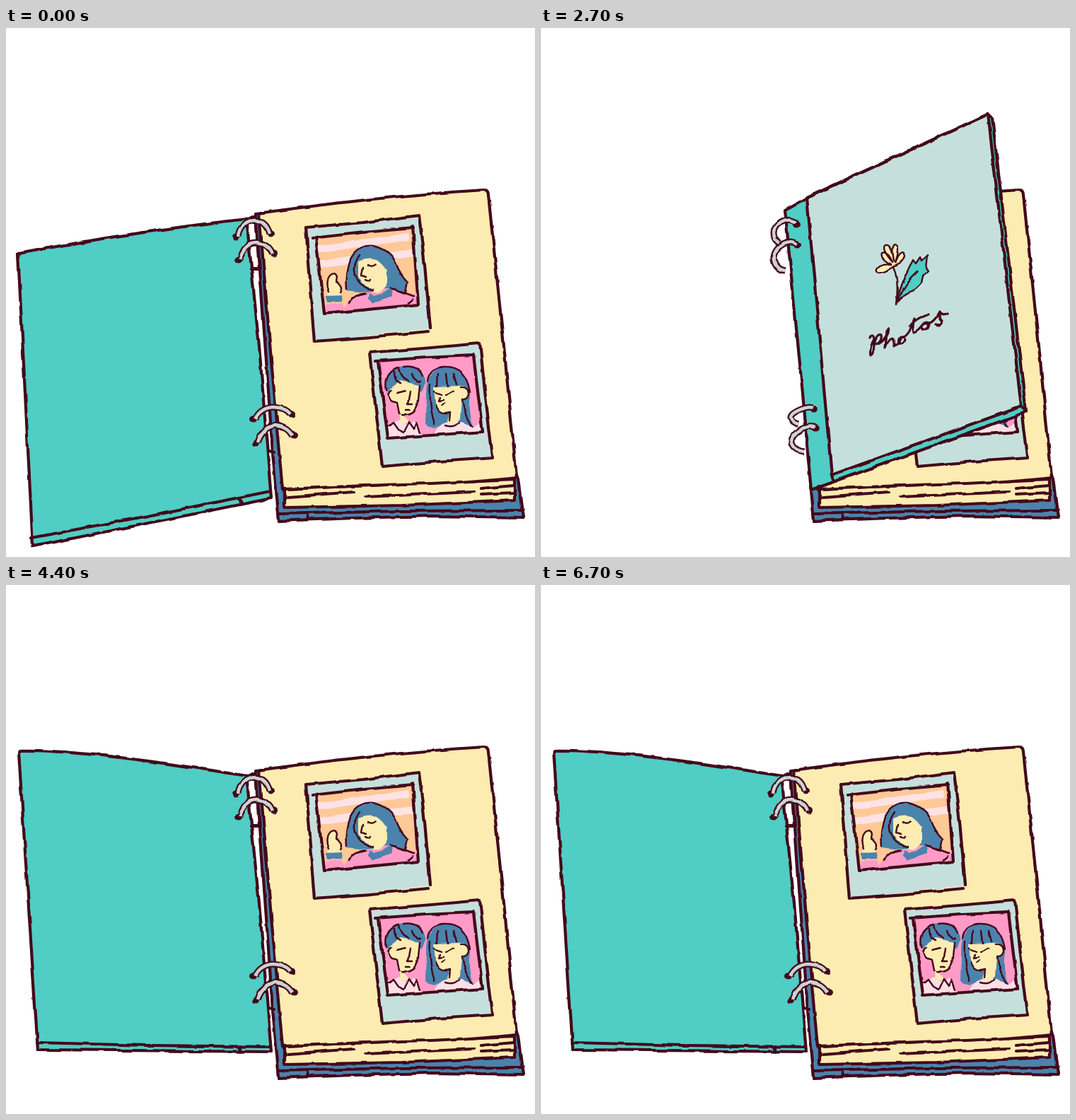
An HTML page for the animation above (6810 ms loop, 748 by 748 pixels).

```html
<!DOCTYPE html>
<html lang="en">
<head>
<meta charset="utf-8">
<title>Photo album</title>
<style>
  html, body { margin: 0; width: 100%; height: 100%; overflow: hidden; background: #fff; }
  svg { display: block; width: 100%; height: 100%; }
  path { fill: none; stroke-linecap: round; stroke-linejoin: round; }
  .ink { stroke: #43081a; stroke-width: 4.2; vector-effect: non-scaling-stroke; }
  .fine { stroke-width: 2.4; }
  .script { stroke-width: 3.2; }
  .teal { fill: #50cdc4; }
  .pale { fill: #c5e0dc; }
  .cream { fill: #fdecb1; }
  .blue { fill: #4b83ad; }
  .pink { fill: #ff9bc6; }
  .blush { fill: #fbdfe6; }
  .orange { fill: #ffc897; }
  .stripe { stroke: #fde3e6; stroke-width: 10; stroke-linecap: butt; }
  .ring { stroke: #43081a; stroke-width: 9; stroke-linecap: butt; }
  .shine { stroke: #cdd2d4; stroke-width: 4.4; stroke-linecap: butt; }
  .hole { fill: #43081a; }
  #poses > g { display: none; }
</style>
</head>
<body>
<svg viewBox="0 0 748 748">
  <!-- Slight unevenness of a hand-held pen -->
  <filter id="pen" filterUnits="userSpaceOnUse" x="0" y="0" width="748" height="748" color-interpolation-filters="sRGB">
    <feTurbulence type="fractalNoise" baseFrequency=".04" numOctaves="2" seed="4"/>
    <feDisplacementMap in="SourceGraphic" scale="5" xChannelSelector="R" yChannelSelector="G"/>
  </filter>

  <g filter="url(#pen)">
    <g id="book">
      <path class="ink blue" d="M353 262 L359 342 L377 600 L386 697 Q480 693 600 690 L731 692 L724 638 L640 400 L362 261Z"/>
      <path class="ink cream" d="M394 652 L394 678 L560 675 L719 668 L719 638Z"/>
      <path class="ink cream" d="M358 262 Q400 256 440 251 Q560 236 676 229 Q682 229 682 236 L703 440 L722 635 Q640 644 560 645 L392 652 L375 470Z"/>
      <path class="ink" d="M398 663 L493 656 M508 663 L661 656 M672 651 L718 647 M671 660 L719 658 M386 687 L560 683 L729 682 M427 686 L427 694"/>
    </g>

    <g id="portrait">
      <path class="pale" d="M424 282 L584 265 L600 425 L437 443Z"/>
      <path class="orange" d="M438 296 L576 283 L583 391 L450 404Z"/>
      <path class="stripe" d="M440 313 L490 306 L570 295 M442 334 L490 327 L577 318"/>
      <path class="pink" d="M449 404 L453 391 L474 389 L478 395 L486 384 L504 374 L545 369 L580 377 L583 391Z"/>
      <path class="blue" d="M482 372 Q480 352 486 326 Q497 306 517 307 Q545 314 552 334 Q557 348 568 359 L564 374 L540 369 L500 374Z"/>
      <path class="cream" d="M498 330 Q512 324 524 328 Q533 334 538 343 L538 365 Q529 378 519 373 L516 368 Q500 364 498 350Z"/>
      <path class="cream" d="M456 378 Q451 359 457 349 Q464 342 468 350 L467 359 Q479 365 474 371 L472 381Z"/>
      <path class="blue" d="M452 379 L475 378 L474 387 L454 388Z M513 374 L521 378 L532 376 L545 367 L546 380 L534 384 L520 389 L512 382Z"/>
      <path class="ink fine" d="M500 321 Q488 338 496 354 Q500 367 518 370 M482 370 Q480 348 487 327 Q498 306 519 308 Q544 313 552 334 Q557 348 568 359 L565 374 L544 368 M504 338 L502 350 L508 352 M511 336 Q518 340 523 335 M507 356 Q511 359 514 355 M456 372 Q450 357 458 349 Q466 344 468 352 L467 359 Q479 366 473 374 M485 388 Q494 377 508 375 M549 369 L576 379 M568 389 L575 383"/>
      <path class="ink" d="M433 297 L506 289 L576 283 M438 296 L450 404 L583 391 L575 280 M437 443 L424 282 L505 275 L584 265 L592 335 L600 424 M437 443 L515 437 L597 429"/>
    </g>

    <g id="couple">
      <path class="pale" d="M514 459 L670 446 L688 607 L532 620Z"/>
      <path class="pink" d="M526 472 L662 463 L674 571 L540 580Z"/>
      <path class="blue" d="M538 514 Q533 485 555 479 Q580 475 588 490 Q596 499 588 514Z M594 520 Q593 482 622 478 Q654 480 656 520 Q652 545 661 563 L640 562 L626 558 L606 566 L593 560Z"/>
      <path class="blush" d="M539 578 L537 562 L557 554 L567 563 L577 556 L588 576Z M606 574 Q612 561 625 557 L644 557 L660 563 L672 558 L673 571Z"/>
      <path class="cream" d="M543 510 L558 499 L584 505 L582 534 Q575 549 561 546 L570 560 L558 558 L556 534 L548 530 Q537 520 543 510Z M606 507 L643 506 Q655 506 654 518 Q652 526 644 525 L642 553 Q634 564 624 556 L627 546 Q612 547 608 530Z"/>
      <path class="ink fine" d="M538 512 Q534 486 555 480 M549 486 Q549 500 558 503 M556 480 Q558 496 569 499 M574 489 Q576 498 585 500 M563 479 Q582 476 588 492 M544 512 Q536 521 546 528 L554 530 L557 545 M553 516 L565 513 M572 513 L569 532 L575 532 M566 540 L571 540 M584 505 L581 536 Q576 549 560 547 M541 563 L547 558 L554 568 L562 572 L569 558 L576 568 L580 559 L585 572"/>
      <path class="ink fine" d="M595 500 Q598 481 618 479 Q650 477 656 515 M600 503 Q598 535 606 560 M611 489 L610 506 M622 489 L624 506 M633 488 L637 504 M643 508 Q654 507 654 518 Q652 526 645 525 Q649 552 659 562 M606 514 L616 518 M622 518 L632 513 M614 522 L612 527 L619 526 M617 533 L621 531 M608 533 Q613 549 628 544 L627 555 M622 562 Q634 566 641 558"/>
      <path class="ink" d="M522 471 L594 466 L661 463 L674 571 L540 580 L526 472 M532 620 L514 459 L590 453 L670 446 L680 540 L688 605 M532 620 L610 613 L688 608"/>
    </g>

    <g id="poses"></g>
  </g>
</svg>

<script>
const line = (cls, d) => `<path class="${cls}" d="${d}"/>`;
const poly = (cls, ...points) => line(cls, `M${points.join(' L')}Z`);
const stroke = (...points) => line('ink', `M${points.join(' L')}`);
const hole = ([x, y]) => `<ellipse class="hole" cx="${x}" cy="${y}" rx="5" ry="4.5"/>`;
const ring = (d, ...ends) => ends.map(hole).join('') + line('ring', d) + line('shine', d);

const openRings =
  stroke([343, 270], [353, 265], [358, 341], [346, 341]) +
  stroke([371, 598], [380, 600]) +
  ring('M328 295 Q332 273 353 272 Q368 273 373 291', [325, 296], [375, 291]) +
  ring('M331 327 Q336 303 354 303 Q371 305 377 320', [329, 328], [379, 319]) +
  ring('M352 553 Q360 537 378 536 Q396 537 402 546', [349, 553], [404, 546]) +
  ring('M356 586 Q362 565 381 562 Q398 564 405 577', [353, 587], [407, 577]);

// Rings seen from the spine; shift moves the holes with the cover.
function sideRings(shift) {
  const low = shift * .8;
  return ring(`M${350 + shift} 276 C${344 + shift} 267 330 272 329 290 Q329 301 338 304`, [351 + shift, 278]) +
    ring(`M${351 + shift} 306 C${344 + shift} 296 327 306 329 328 Q332 342 345 343`, [352 + shift, 307]) +
    ring(`M${376 + low} 537 C${368 + low} 534 353 543 353 551 Q355 558 364 560`, [377 + low, 539]) +
    ring(`M${379 + low} 565 C${368 + low} 559 352 573 354 587 Q358 598 372 599`, [380 + low, 566]);
}

const art =
  line('ink fine cream', 'M497 337 Q490 346 477 346 Q470 342 478 336 Q486 332 495 334 Q479 326 482 318 Q490 315 497 331 Q480 311 487 307 Q496 305 499 329 Q495 307 501 306 Q509 309 501 331 Q509 315 513 319 Q515 330 497 337Z') +
  line('ink fine teal', 'M502 388 Q508 361 517 347 L526 328 L530 333 L536 324 L538 329 L546 321 L544 340 L547 344 L539 352 L537 361 L527 371 Q512 375 502 388Z') +
  line('ink fine', 'M498 337 Q507 359 502 390 M503 386 Q515 358 532 344') +
  line('ink script', 'M464 438 Q470 431 471 440 Q464 452 466 464 Q471 460 471 446 Q475 431 481 434 Q483 443 472 447 Q484 445 491 430 Q493 422 489 428 L487 452 Q492 438 497 438 Q500 444 499 450 Q505 446 509 436 Q503 438 505 445 Q511 448 514 440 Q514 434 509 436 Q518 439 528 412 Q524 428 528 431 Q535 429 542 418 Q537 422 540 427 Q548 428 549 418 Q546 414 542 418 Q554 420 563 402 Q562 411 567 415 Q566 422 558 419 M563 403 Q568 408 575 404 M521 421 Q534 410 548 405');

const frame = ({ tl, tr, bl }) =>
  new DOMMatrix([tr[0] - tl[0], tr[1] - tl[1], bl[0] - tl[0], bl[1] - tl[1], ...tl]);

function insideCover({ tl, bl, side, foot, top, seam, tick }) {
  const outer = line('ink teal', `M${side} L${tl} ${top ? `Q${top} ` : 'L'}340 270 L358 450 L375 ${foot} L${bl} Z`);
  return outer + stroke(...seam) + stroke(...tick) + openRings;
}

// The panel corners also place the artwork; rim is the visible board thickness.
function outsideCover(cover) {
  const { hinge, tl, tr, br, bl, rim, heel, shift } = cover;
  const m = frame(cover).multiply(frame(artCover).inverse());
  return poly('ink teal', hinge, tl, tr, rim[0], rim[1], heel) +
    poly('ink pale', tl, tr, br, bl) +
    stroke(bl, [bl[0] + 2, bl[1] + 7]) + stroke(br, rim[1]) +
    `<g transform="${m}">${art}</g>` + sideRings(shift);
}

const inside = [
  { side: [17, 319], tl: [17, 319], bl: [38, 733], foot: 665, top: [178, 288],
    seam: [[36, 721], [200, 690], [374, 655]], tick: [[329, 664], [333, 672]] },
  { side: [18, 237], tl: [20, 234], bl: [45, 657], foot: 660, top: [115, 233],
    seam: [[44, 647], [200, 651], [374, 653]], tick: [[331, 652], [331, 660]] },
  { side: [62, 152], tl: [69, 146], bl: [98, 574], foot: 655, top: [190, 205],
    seam: [[69, 147], [105, 565], [374, 645]], tick: [[339, 635], [334, 644]] },
  { side: [153, 96], tl: [163, 89], bl: [190, 506], foot: 652,
    seam: [[163, 90], [179, 290], [200, 499], [374, 644]], tick: [[350, 624], [343, 632]] },
  { side: [270, 47], tl: [283, 40], bl: [308, 465], foot: 652,
    seam: [[283, 41], [321, 456], [374, 640]], tick: [[364, 605], [359, 610]] }
];

const artCover = { hinge: [345, 257], tl: [376, 240], tr: [632, 122], br: [679, 535], bl: [411, 632],
  rim: [[638, 128], [686, 543]], heel: [383, 653], shift: 11 };
const outside = [
  { hinge: [336, 256], tl: [346, 226], tr: [402, 40], br: [442, 456], bl: [390, 625],
    rim: [[417, 45], [456, 462]], heel: [379, 653], shift: -7 },
  { hinge: [338, 257], tl: [362, 231], tr: [522, 67], br: [572, 483], bl: [402, 631],
    rim: [[535, 72], [579, 488]], heel: [381, 653], shift: 0 },
  artCover,
  { hinge: [348, 258], tl: [383, 248], tr: [686, 222], br: [724, 629], bl: [417, 644],
    rim: [[692, 227], [732, 638]], heel: [384, 658], shift: 16 }
];

const poses = document.getElementById('poses');
poses.innerHTML = [...inside.map(insideCover), ...outside.map(outsideCover)]
  .map(markup => `<g>${markup}</g>`).join('');

const LOOP = 6810, CYCLE = 3400, HOLD = 1000, STEP = 100, CLOSED = 8;

function poseAt(time) {
  const t = time % LOOP;
  const s = t < 2 * CYCLE ? t % CYCLE : CYCLE - 1;
  if (s < HOLD) return 0;
  const turn = Math.floor((s - HOLD) / STEP);
  return turn < 7 ? turn + 1 : turn < 17 ? CLOSED : 24 - turn;
}

const start = performance.now();
let shown = -1;
function draw() {
  const pose = poseAt(performance.now() - start);
  if (pose !== shown) {
    if (shown >= 0) poses.children[shown].style.display = 'none';
    poses.children[pose].style.display = 'inline';
    shown = pose;
  }
  requestAnimationFrame(draw);
}
draw();
</script>
</body>
</html>
```
